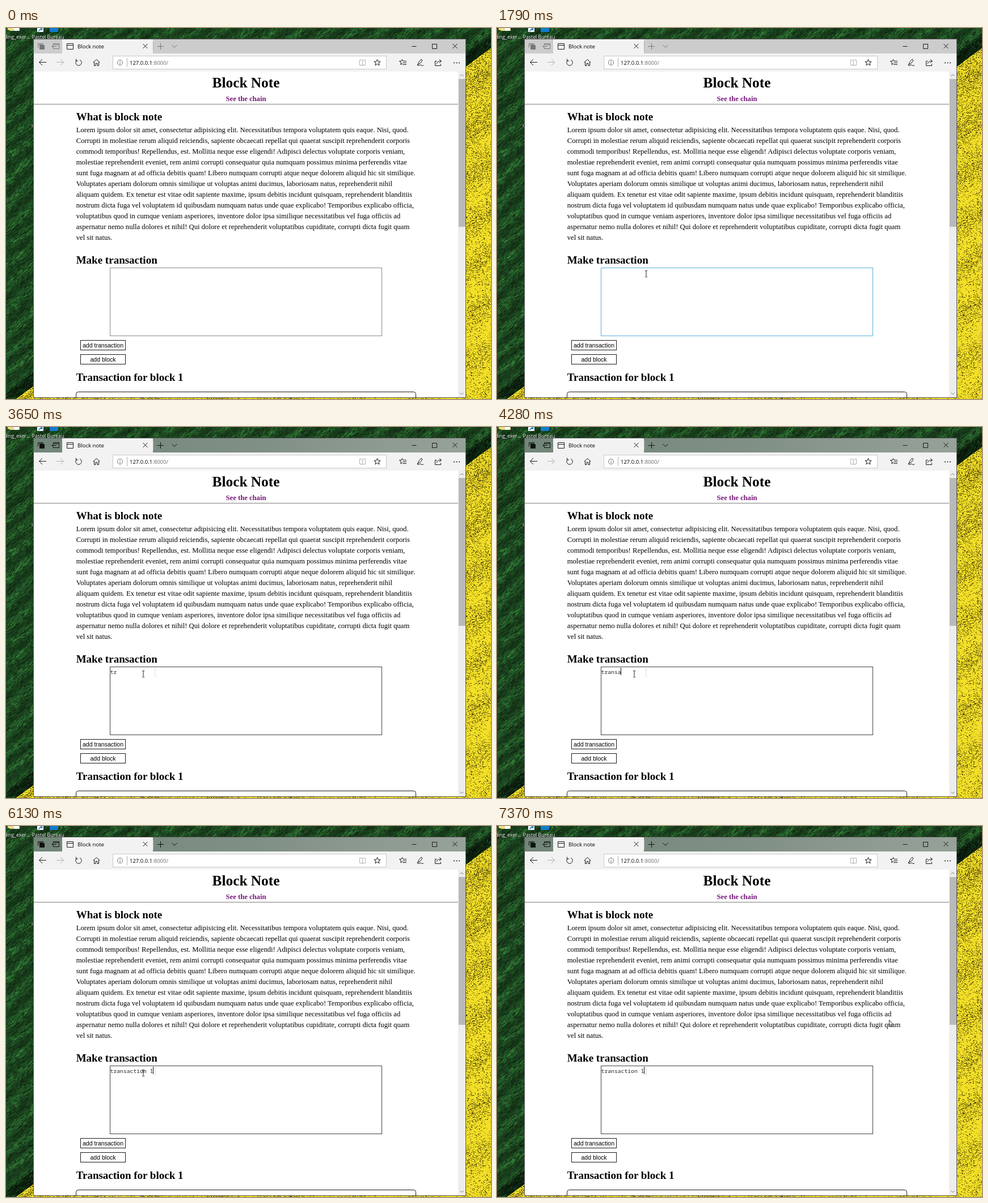
Recreate the animation shown at these times as an HTML page with a canvas. Size 855 px wide and 655 px high, loop 8 s.

```html
<!DOCTYPE html>
<html lang="en">
<head>
<meta charset="utf-8">
<title>Block note</title>
<style>
html, body { margin: 0; width: 100%; height: 100%; overflow: hidden; background: #123a1c; }
canvas, svg { position: absolute; left: 0; top: 0; display: block; }
text { font-family: "Liberation Serif", "Times New Roman", serif; font-size: 12.667px; fill: #000; white-space: pre; }
.bold { font-weight: bold; }
.h1 { font-size: 25.333px; font-weight: bold; }
.h2 { font-size: 19px; font-weight: bold; }
.btn { font-family: "Liberation Sans", Arial, sans-serif; font-size: 10.556px; }
.ui { font-family: "Open Sans", sans-serif; font-size: 9.6px; }
.desk { font-size: 8.8px; fill: #fff; text-shadow: 1px 1px 1px #000; }
.mono { font-family: "Noto Sans Mono", monospace; font-size: 9.73px; fill: #222; }
.mid { text-anchor: middle; }
.line { fill: none; stroke: #1a1a1a; }
.dim { stroke: #b0b0b0; }
</style>
</head>
<body>
<canvas id="desk" width="855" height="655"></canvas>
<svg width="855" height="655" viewBox="0 0 855 655">
  <defs>
    <linearGradient id="glass">
      <stop offset="0" stop-color="#72867a"/>
      <stop offset=".5" stop-color="#7f8f85"/>
      <stop offset="1" stop-color="#97a299"/>
    </linearGradient>
    <clipPath id="page"><rect x="49" y="77" width="748" height="575"/></clipPath>
    <path id="beam" d="M-2 .5H-.5L0 1L.5 .5H2M0 1V10.5M-2 11.5H-.5L0 11L.5 11.5H2" fill="none"/>
    <path id="arrow" d="M.5 .5V10.6L2.7 8.5L4.2 12.2L5.8 11.5L4.3 8H7.2Z" fill="#fff" stroke="#222" stroke-width=".9"/>
    <path id="star" d="M0-5.6L1.6-1.8L5.6-1.6L2.5 .9L3.6 4.9L0 2.6L-3.6 4.9L-2.5 .9L-5.6-1.6L-1.6-1.8Z"/>
  </defs>

  <!-- desktop icons -->
  <path d="M3 0H24V5H8L3 3Z" fill="#f1dc83"/>
  <rect x="14" width="9" height="5" fill="#fff"/>
  <rect x="55" width="11" height="7" fill="#fff"/>
  <path d="M58 6Q58 2 63 2M61 0L64 2L61 4" fill="none" stroke="#1976c8" stroke-width="1.4"/>
  <rect x="77" y="-8" width="15" height="15" fill="#0f7dcb"/>
  <text class="ui desk" x="43" y="19" text-anchor="end">ding_exer...</text>
  <text class="ui desk" x="74" y="19" text-anchor="middle">Pastel Bureau</text>
  <text class="ui desk" x="45" y="175">u</text>

  <!-- browser frame -->
  <rect x="48.5" y="19.5" width="762" height="633" fill="#fff" stroke="#555"/>
  <rect id="bar" x="49" y="20" width="761" height="25"/>
  <path d="M99 20H259V45H810V77H49V45H99Z" fill="#f2f2f2"/>
  <g id="tabTools" fill="none">
    <path d="M56.5 34.5V27.5H65.5V29M58 29.5H65"/>
    <path id="stack" d="M59.5 30.5H67.5V37.5H59.5Z"/>
    <path d="M83.5 30V27.5H93.5V36.5H83.5V34M83 29.5H93M81 32.5H89M83.5 30L81 32.5L83.5 35"/>
    <path d="M266.5 32.5H278M272.5 27V38M292.5 30L297 34.5L301.5 30"/>
  </g>
  <path class="line dim" d="M259.5 24V41"/>
  <path class="line" d="M107.5 27.5H118.5V37.5H107.5ZM107 30.5H119"/>
  <text class="ui" x="126" y="35.5">Block note</text>
  <path class="line" d="M241.5 28L249.5 36M249.5 28L241.5 36M715.5 32.5H723.5M751.5 28.5H759.5V36.5H751.5ZM787.5 28L795.5 36M795.5 28L787.5 36"/>

  <rect x="188.5" y="49.5" width="482" height="23" fill="#fff" stroke="#c8c8c8"/>
  <g class="line">
    <path d="M58.5 60.5H71M64 55L58.5 60.5L64 66"/>
    <path class="dim" d="M89 60.5H101.5M96 55L101.5 60.5L96 66"/>
    <path d="M124.5 57.2A5.2 5.2 0 1 0 130 56.2M123.5 54.5V58H127"/>
    <path d="M153.5 61L159.5 55.5L165.5 61M155.5 60V66.5H158V62.5H161V66.5H163.5V60"/>
    <g stroke="#777"><circle cx="201" cy="61" r="4.6"/><path d="M201 60V64M201 58V59"/></g>
    <path class="dim" d="M213.5 53V69M628.5 57V66M623.5 56.5H627L628.5 57.5L630 56.5H633.5V65.5H630L628.5 66.5L627 65.5H623.5Z"/>
    <use href="#star" x="654.5" y="61"/>
    <path d="M699 61.5L696 65V61L693.5 58.5H697L698.5 55.5L700 58.5H706M700 61.5H706M699 64.5H706"/>
    <path d="M725 66Q728 58 732 55L734 57Q732 62 727 64Q724 66 727 66.5Q731 64 731.5 65.5T736 66"/>
    <path d="M759.5 58.5H756.5V66.5H766.5V63.5M759 63Q760 58.5 767 58.5M764 55.5L767.5 58.5L764 61.5"/>
    <path d="M789 61.5H791M793.5 61.5H795.5M798 61.5H800" stroke-width="1.6"/>
  </g>
  <text class="ui" x="218" y="64.7" style="font-size:9.5px">127.0.0.1<tspan fill="#6a6a6a">:8000/</tspan></text>

  <!-- page -->
  <g clip-path="url(#page)">
    <text class="h1 mid" x="423" y="105">Block Note</text>
    <text class="bold mid" x="423" y="129" style="fill:#76177a">See the chain</text>
    <path d="M49 134.5H797" stroke="#808080"/>
    <text class="h2" x="123.7" y="163">What is block note</text>
    <g id="lorem"></g>
    <text class="h2" x="123.7" y="416">Make transaction</text>
    <rect id="area" x="183.5" y="423.5" width="479" height="120" fill="#fff"/>
    <g class="line">
      <rect x="131.5" y="551.5" width="79" height="17"/>
      <rect x="131.5" y="576.5" width="79" height="17"/>
      <rect x="123.5" y="642.5" width="599" height="40" rx="4"/>
    </g>
    <text class="btn mid" x="171" y="564">add transaction</text>
    <text class="btn mid" x="171" y="589">add block</text>
    <text class="h2" x="123.7" y="623">Transaction for block 1</text>
  </g>
  <rect x="797" y="77" width="13" height="575" fill="#ededed"/>
  <rect x="798" y="90" width="12" height="261" fill="#b9b9b9"/>
  <path d="M800.5 85L803.5 82L806.5 85M800.5 644L803.5 647L806.5 644" fill="none" stroke="#777"/>

  <!-- moving parts -->
  <text id="typed" class="mono" x="183.6" y="436"></text>
  <use id="ghost" href="#beam" x="263" y="428" stroke="#ddd"/>
  <rect id="caret" y="425" width="1" height="13" fill="#111"/>
  <use id="cursor" stroke="#222"/>
</svg>
<script>
const $ = id => document.getElementById(id);
const set = (id, attrs) => { for (const k in attrs) $(id).setAttribute(k, attrs[k]); };

const lorem = `Lorem ipsum dolor sit amet, consectetur adipisicing elit. Necessitatibus tempora voluptatem quis eaque. Nisi, quod.
Corrupti in molestiae rerum aliquid reiciendis, sapiente obcaecati repellat qui quaerat suscipit reprehenderit corporis
commodi temporibus! Repellendus, est. Mollitia neque esse eligendi! Adipisci delectus voluptate corporis veniam,
molestiae reprehenderit eveniet, rem animi corrupti consequatur quia numquam possimus minima perferendis vitae
sunt fuga magnam at ad officia debitis quam! Libero numquam corrupti atque neque dolorem aliquid hic sit similique.
Voluptates aperiam dolorum omnis similique ut voluptas animi ducimus, laboriosam natus, reprehenderit nihil
aliquam quidem. Ex tenetur est vitae odit sapiente maxime, ipsum debitis incidunt quisquam, reprehenderit blanditiis
nostrum dicta fuga vel voluptatem id quibusdam numquam natus unde quae explicabo! Temporibus explicabo officia,
voluptatibus quod in cumque veniam asperiores, inventore dolor ipsa similique necessitatibus vel fuga officiis ad
aspernatur nemo nulla dolores et nihil! Qui dolore et reprehenderit voluptatibus cupiditate, corrupti dicta fugit quam
vel sit natus.`;
$('lorem').innerHTML = lorem.split('\n')
  .map((line, i) => `<text x="123.7" y="${184 + 19 * i}">${line}</text>`).join('');

// Wallpaper: leafy green above a diagonal edge, speckled yellow below it
function paintDesk() {
  const g = $('desk').getContext('2d');
  let seed = 7;
  const rnd = () => (seed = seed * 16807 % 2147483647) / 2147483647;
  const edge = x => 668 - .74 * x;
  g.fillStyle = '#1a4721';
  g.fillRect(0, 0, 855, 655);
  g.fillStyle = '#f2df27';
  g.beginPath();
  g.moveTo(0, edge(0));
  g.lineTo(855, edge(855));
  g.lineTo(855, 655);
  g.lineTo(0, 655);
  g.fill();
  for (let y = 0; y < 655; y++) for (let x = 0; x < 855; x++) {
    if (x > 50 && x < 808 && y > 21 && y < 651) continue;
    const d = y - edge(x), r = rnd();
    if (d > 0) {
      const density = .14 + .08 * Math.sin((x * .7 + y) / 13) + .14 * Math.exp(-d / 200);
      if (r > density) continue;
      g.fillStyle = rnd() < .5 ? '#4d430b' : '#a1911a';
      g.fillRect(x, y, 1 + rnd(), 1);
    } else if (r < .24) {
      const row = .7 + .3 * Math.sin((x * .8 + y) / 6 + Math.sin(y / 31));
      const light = d > -24 ? 3 + rnd() * 8 : 7 + 36 * rnd() * row;
      g.strokeStyle = `hsl(${114 + rnd() * 18} 42% ${light}%)`;
      g.beginPath();
      g.moveTo(x, y);
      g.lineTo(x + 3 + 4 * rnd(), y - 3 - 3 * rnd());
      g.stroke();
    }
  }
}
paintDesk();

// start, typed characters, caret shown, cursor shape, cursor x, cursor y
const full = 'transaction 1';
const steps = [
  [0, 0, 0],
  [550, 0, 0, 'arrow', 524, 557],
  [1180, 0, 0, 'beam', 325, 432],
  [1790, 0, 0, 'beam', 263, 428],
  [2410, 0, 1, 'beam', 242, 430],
  [3040, 1, 1, 'beam', 242, 430],
  [3650, 2, 0, 'beam', 242, 430],
  [4280, 6, 1, 'beam', 242, 430],
  [4890, 9, 1, 'beam', 242, 430],
  [5520, 12, 1, 'beam', 242, 430],
  [6130, 13, 1, 'beam', 242, 430],
  [6760, 13, 0, 'arrow', 422, 385],
  [7370, 13, 1, 'arrow', 691, 342]
];

function draw(t) {
  const [, chars, caret, shape, x, y] = steps.findLast(s => s[0] <= t);
  const focus = t >= 2410, hover = !focus && t >= 1180;
  const ink = focus ? '#111' : '#777';
  set('bar', { fill: focus ? 'url(#glass)' : '#ccc' });
  set('tabTools', { stroke: ink });
  set('stack', { fill: ink });
  set('area', { stroke: focus ? '#444' : hover ? '#58b0dd' : '#8a8a8a' });
  $('typed').textContent = full.slice(0, chars);
  set('ghost', { visibility: focus ? 'visible' : 'hidden' });
  set('caret', { x: Math.floor(183.3 + 5.84 * chars), visibility: caret ? 'visible' : 'hidden' });
  set('cursor', shape ? { href: '#' + shape, x, y, visibility: 'visible' } : { visibility: 'hidden' });
}

const begin = performance.now();
function tick() {
  draw((performance.now() - begin) % 8000);
  requestAnimationFrame(tick);
}
tick();
</script>
</body>
</html>
```
